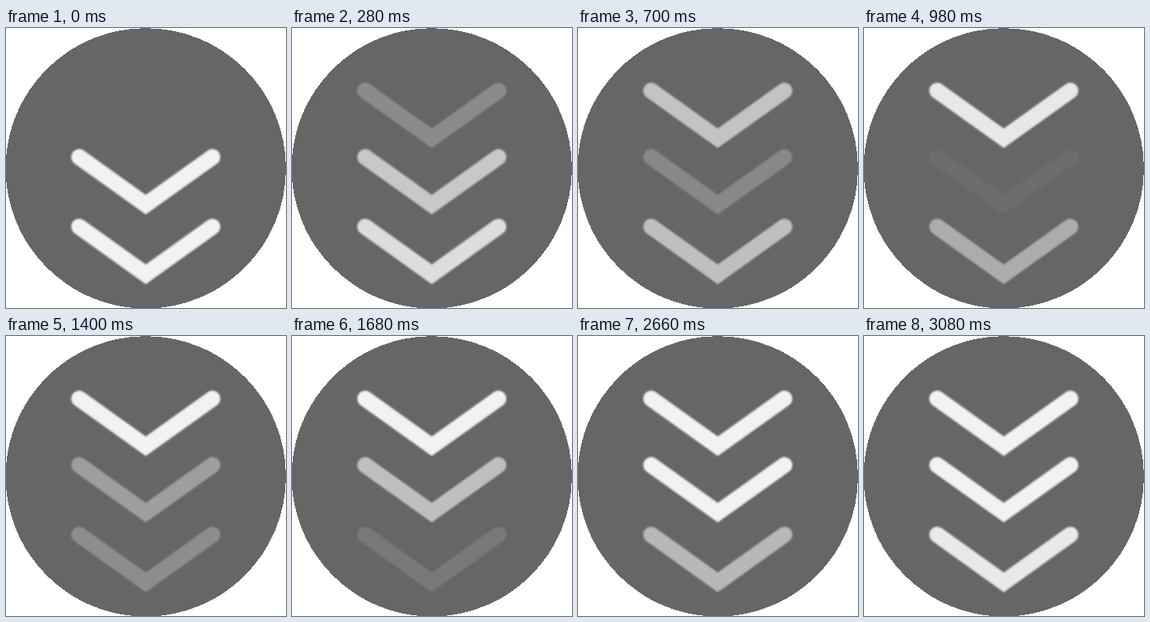
Animation, 350 px wide and 350 px high, one loop 3.5 s. Source, as an HTML page:

```html
<!DOCTYPE html>
<html lang="en">
<head>
<meta charset="utf-8">
<title>Scroll down</title>
<style>
  html, body { margin: 0; width: 100%; height: 100%; overflow: hidden; background: #fff; }
  svg { display: block; width: 100%; height: 100%; }
  .arrow { fill: none; stroke: #f2f2f2; stroke-width: 20; stroke-linecap: round; stroke-linejoin: miter; }
  .soft { filter: blur(0.8px); }
</style>
</head>
<body>
<svg viewBox="0 0 350 350">
  <circle cx="174.75" cy="175.4" r="175.2" fill="#666" shape-rendering="crispEdges"/>
  <g class="soft">
    <path class="arrow" d="M91.5 78.3 L174.7 137.8 L258 78.3"/>
    <path class="arrow" d="M91.5 161.3 L174.7 220.8 L258 161.3"/>
    <path class="arrow" d="M91.5 248.4 L174.7 308 L258 248.4"/>
  </g>
</svg>
<script>
  const LOOP = 3500, STEP = 140, LAST = 22;
  const arrows = document.querySelectorAll('.arrow');
  const clamp = v => Math.min(1, Math.max(0, v));

  // Fade out until step `low`, then back in over `rise` steps.
  const dip = (k, low, rise) => clamp(k < low ? 1 - k / low : (k - low) / rise);

  function draw(ms) {
    const k = Math.min(LAST, Math.floor((ms % LOOP) / STEP));
    const levels = [dip(k, 0, 7.5), dip(k, 6.6, 8.4), dip(k, 14, 8.5)];
    arrows.forEach((arrow, i) => arrow.setAttribute('opacity', levels[i]));
  }

  const start = performance.now();
  function tick() {
    draw(performance.now() - start);
    requestAnimationFrame(tick);
  }
  tick();
</script>
</body>
</html>
```
